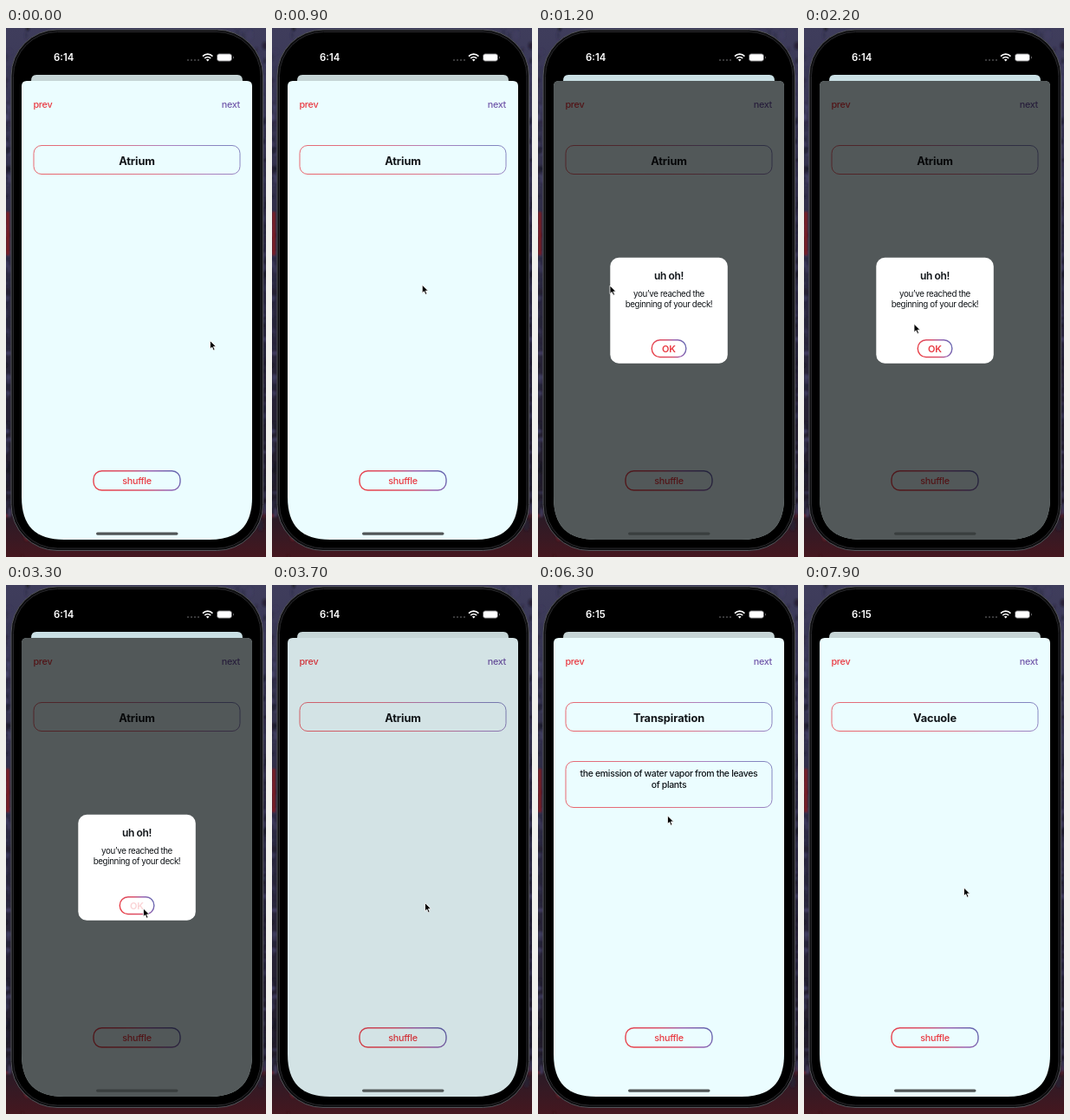
An HTML page for the animation above (8000 ms loop, 300 by 610 pixels).

```html
<!DOCTYPE html>
<html lang="en">
<head>
<meta charset="utf-8">
<title>Flashcards</title>
<style>
  html, body { margin: 0; width: 100%; height: 100%; overflow: hidden; background: #1d1b29; }
  svg { display: block; width: 300px; height: 610px; }
  text { font-family: Inter, "Liberation Sans", sans-serif; fill: #111519; }
  .mid { text-anchor: middle; }
  .clock { font-size: 11.4px; font-weight: 600; fill: #fff; }
  .nav { font-size: 10.8px; font-weight: 500; letter-spacing: -.3px; }
  .title { font-size: 12.8px; font-weight: 700; letter-spacing: -.1px; }
  .body { font-size: 10.5px; font-weight: 500; letter-spacing: -.35px; }
  .head { font-size: 12px; font-weight: 600; letter-spacing: -.35px; }
  .note { font-size: 9.8px; letter-spacing: -.4px; }
  .ok { font-size: 11px; font-weight: 600; letter-spacing: -.2px; }
  .red { fill: #e93a42; }
  .violet { fill: #7259ab; }
  .box { fill: none; stroke: url(#edge); stroke-width: .8; }
  .pill { stroke-width: 1.4; }
</style>
</head>
<body>
<svg viewBox="0 0 300 610">
  <defs>
    <linearGradient id="edge" x1="0" y1=".6" x2="1" y2=".4">
      <stop offset="0" stop-color="#e8414a"/>
      <stop offset=".5" stop-color="#d9506a"/>
      <stop offset=".75" stop-color="#9a62b0"/>
      <stop offset="1" stop-color="#6a67b0"/>
    </linearGradient>
    <linearGradient id="wall" x1="0" y1="0" x2="0" y2="1">
      <stop offset="0" stop-color="#3f3d5c"/>
      <stop offset=".5" stop-color="#2b2840"/>
      <stop offset=".9" stop-color="#221c29"/>
      <stop offset="1" stop-color="#45171f"/>
    </linearGradient>
    <filter id="soft"><feGaussianBlur stdDeviation=".8"/></filter>
    <path id="sheet" d="M18 67q0-6 6-6H278q6 0 6 6V541C284 574 268 590 235 590H67C34 590 18 574 18 541Z"/>
  </defs>

  <rect width="300" height="610" fill="url(#wall)"/>
  <g id="blots" filter="url(#soft)"></g>

  <!-- handset -->
  <rect x="6" y="2" width="290.5" height="600.5" rx="53" fill="#0c0c0e" stroke="#55565b"/>
  <rect x="8.5" y="4.5" width="285.5" height="595.5" rx="51" stroke="#29292c"/>

  <!-- status bar -->
  <text id="clock" class="clock" x="55" y="38">6:14</text>
  <path d="M210 37h13" stroke="#4c4c4e" stroke-width="2" stroke-linecap="round" stroke-dasharray="0 4"/>
  <g fill="none" stroke="#fff" stroke-width="1.7">
    <path d="M227 32.6a8 8 0 0 1 11.4 0"/>
    <path d="M229.2 35a5 5 0 0 1 7 0"/>
  </g>
  <path d="M230.9 36.6a2.6 2.6 0 0 1 3.6 0l-1.8 1.9Z" fill="#fff"/>
  <rect x="243.5" y="29.8" width="17" height="8.4" rx="2.6" fill="#fff" stroke="#4a4a4c" stroke-width=".8"/>
  <path d="M262 32.5a1.7 1.7 0 0 1 0 3Z" fill="#77777a"/>

  <path id="back" d="M29 61q0-7 6-7H267q6 0 6 7Z"/>
  <use href="#sheet" fill="#ebfdff"/>

  <text class="nav red" x="31.5" y="92">prev</text>
  <text class="nav violet" x="270" y="92" text-anchor="end">next</text>
  <rect class="box" x="32" y="135.5" width="238" height="33" rx="9"/>
  <text id="title" class="title mid" x="151" y="157.5">Atrium</text>
  <g id="answer">
    <rect class="box" x="32" y="203.5" width="238" height="53" rx="9"/>
    <text class="body mid" x="151" y="221">the emission of water vapor from the leaves</text>
    <text class="body mid" x="151" y="234">of plants</text>
  </g>
  <rect class="box pill" x="101" y="510.7" width="100" height="22.3" rx="9.5"/>
  <text class="nav red mid" x="151" y="526">shuffle</text>

  <use id="dim" href="#sheet"/>
  <rect id="bar" x="104" y="581.5" width="94.5" height="3.2" rx="1.6"/>

  <g id="alert">
    <rect x="83.3" y="264.8" width="135.5" height="122" rx="10" fill="#fff"/>
    <text class="head mid" x="151" y="290">uh oh!</text>
    <text class="note mid" x="151" y="309.5">you’ve reached the</text>
    <text class="note mid" x="151" y="321.5">beginning of your deck!</text>
    <rect class="box pill" x="131.3" y="359.7" width="39.5" height="19.8" rx="9.5"/>
    <text id="ok" class="ok red mid" x="151" y="373.7">OK</text>
  </g>

  <path id="cursor" d="M0 0V9.6L2.2 7.5 3.8 11.2 5.5 10.4 3.9 6.9H7Z" stroke="#fff" stroke-width=".8" stroke-linejoin="round"/>
</svg>
<script>
const LOOP = 8000, STEP = 100;
const $ = id => document.getElementById(id);

// Resting points of the pointer: time, x, y
const stops = [
  [0, 235.5, 360.5], [400, 100, 298], [800, 190, 296], [1200, 83, 297],
  [3000, 158.5, 373], [3500, 158.5, 373], [4100, 228, 348], [4500, 112, 350],
  [4900, 222.5, 358.5], [5600, 153, 160], [6300, 149.5, 266], [6900, 232, 345],
  [7300, 98, 350], [7900, 184.5, 349]
];

function ease(t, from, to) {
  const p = Math.min(1, Math.max(0, (t - from) / (to - from)));
  return p * p * (3 - 2 * p);
}

function pointer(t) {
  const i = Math.max(1, stops.findIndex(s => s[0] >= t));
  const [t0, x0, y0] = stops[i - 1], [t1, x1, y1] = stops[i];
  const p = ease(t, t0, t1);
  return [x0 + (x1 - x0) * p, y0 + (y1 - y0) * p];
}

function paintWall() {
  let seed = 11, out = "";
  const rnd = () => (seed = seed * 16807 % 2147483647) / 2147483647;
  for (let i = 0; i < 260; i++) {
    const y = rnd() * 610, corner = y < 45 || y > 565;
    const x = (rnd() < .5 ? 0 : 297) + (rnd() - .5) * (corner ? 60 : 8);
    const hue = y > 560 && rnd() < .6 ? 353 : 245;
    const fill = `hsl(${hue} ${hue > 300 ? 55 : 22}% ${8 + rnd() * 30}%)`;
    out += `<ellipse cx="${x}" cy="${y}" rx="${1 + rnd() * 3}" ry="${1 + rnd() * 6}" fill="${fill}" opacity=".65"/>`;
  }
  $("blots").innerHTML = out + '<rect y="212" width="4" height="50" fill="#7c1c22"/>';
}

function draw(time) {
  const t = Math.floor(time % LOOP / STEP) * STEP;
  const show = (id, from, to) => $(id).style.display = t >= from && t < to ? "" : "none";
  const k = ease(t, 930, 1200) - ease(t, 3400, 3800);
  $("cursor").setAttribute("transform", `translate(${pointer(t)})`);
  $("dim").style.opacity = .65 * k;
  $("bar").style.opacity = .66 - .36 * k;
  $("back").style.fill = `rgb(${197 + 4 * k},${212 + 11 * k},${213 + 15 * k})`;
  show("alert", 1000, 3500);
  show("answer", 5700, 7200);
  $("ok").style.opacity = t >= 3200 && t < 3400 ? .22 : 1;
  $("clock").textContent = t < 4200 ? "6:14" : "6:15";
  $("title").textContent = t < 4500 ? "Atrium" : t < 7200 ? "Transpiration" : "Vacuole";
}

paintWall();
const start = performance.now();
(function tick() {
  draw(performance.now() - start);
  requestAnimationFrame(tick);
})();
</script>
</body>
</html>
```
